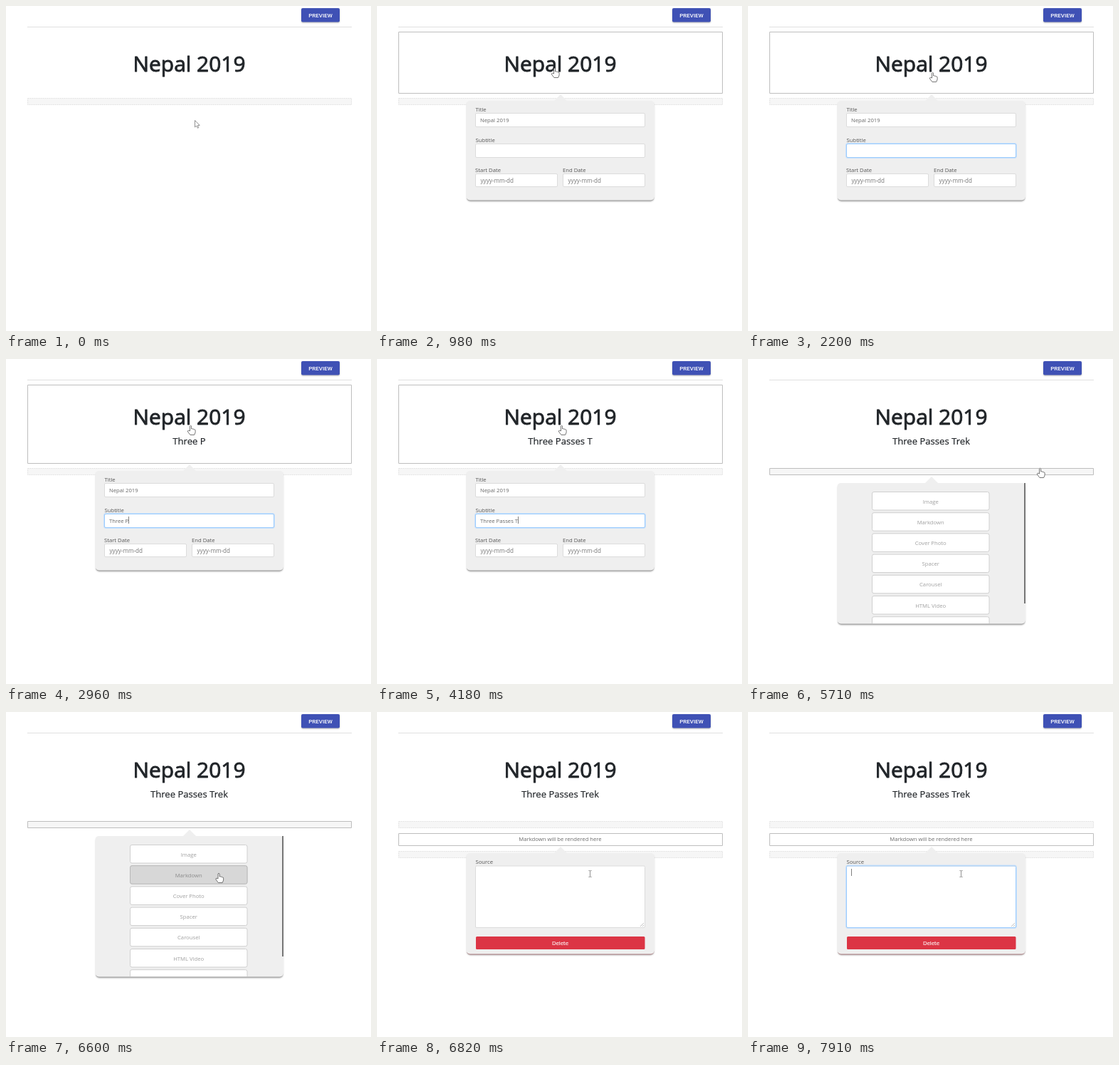
Animation, 513 px wide and 456 px high, one loop 8 s. Source, as an HTML page with a canvas:

```html
<!DOCTYPE html>
<html lang="en">
<head>
<meta charset="utf-8">
<title>Page editor</title>
<style>
  html, body { margin: 0; width: 100%; height: 100%; overflow: hidden; background: #fff; }
  canvas { display: block; }
</style>
</head>
<body>
<canvas id="stage" width="513" height="456"></canvas>
<script>
const ctx = document.getElementById('stage').getContext('2d');
const LOOP = 8000, MID = 257.5;
const SANS = '"Open Sans", "Noto Sans", sans-serif';
const SMALL = '7.7px ' + SANS;
const OUTLINE = '#bebebe';
const MENU = ['Image', 'Markdown', 'Cover Photo', 'Spacer', 'Carousel', 'HTML Video', ''];

// Each track is a list of [start time, value]; values hold until the next start.
const POINTER = [
  [0, ['arrow', 265, 160]], [440, ['hand', 252, 106]], [540, ['hand', 249.5, 87]],
  [1210, ['hand', 255, 91]], [1310, ['hand', 259.5, 93]],
  [5060, ['hand', 275, 100]], [5170, ['hand', 317, 117]], [5270, ['hand', 367, 137]],
  [5380, ['hand', 401, 152]], [5490, ['hand', 410.5, 153]],
  [6040, ['arrow', 400, 167]], [6150, ['arrow', 373, 187]], [6260, ['arrow', 344, 207]],
  [6370, ['hand', 321, 219]], [6490, ['hand', 306, 225]], [6600, ['hand', 299, 226]],
  [6820, ['beam', 299.5, 227]]
];
const SUBTITLE = [
  [0, ''], [2420, 'T'], [2530, 'Th'], [2640, 'Thr'], [2740, 'Three'], [2850, 'Three '],
  [2960, 'Three P'], [3180, 'Three Pas'], [3290, 'Three Pass'], [3400, 'Three Passes'],
  [3520, 'Three Passes '], [4180, 'Three Passes T'], [4290, 'Three Passes Tr'],
  [4400, 'Three Passes Tre'], [4500, 'Three Passes Trek']
];
const CARET = [[0, 0], [1750, 1], [2200, 0], [2420, 1], [3850, 0], [4180, 1], [4950, 0], [5490, 1]];
const TITLE_FOCUS = [[0, 0], [1530, .5], [1640, 1], [1750, .5], [1890, 0]];
const SUBTITLE_FOCUS = [[0, 0], [1750, .5], [1890, 1]];
const ITEM_HOVER = [[0, 0], [6370, .4], [6490, .8], [6600, 1]];
const SOURCE_FOCUS = [[0, 0], [7800, .5], [7910, 1]];

const at = (track, t) => track.reduce((held, [start, v]) => t >= start ? v : held, track[0][1]);

// The optional weight thickens the strokes of the letters.
function text(str, x, y, color, { font = SMALL, align = 'left', weight = 0 } = {}) {
  ctx.font = font;
  ctx.textAlign = align;
  ctx.fillStyle = ctx.strokeStyle = color;
  ctx.fillText(str, x, y);
  if (!weight) return;
  ctx.lineJoin = 'round';
  ctx.lineWidth = weight;
  ctx.strokeText(str, x, y);
}

function box(x, y, w, h, fill, stroke, radius = 0) {
  ctx.beginPath();
  ctx.roundRect(x, y, w, h, radius);
  if (fill) { ctx.fillStyle = fill; ctx.fill(); }
  if (stroke) { ctx.strokeStyle = stroke; ctx.lineWidth = 1; ctx.stroke(); }
}

function shadowed(color, blur, dy, draw) {
  ctx.save();
  ctx.shadowColor = color;
  ctx.shadowBlur = blur;
  ctx.shadowOffsetY = dy;
  draw();
  ctx.restore();
}

function field(x, y, w, h, focus = 0) {
  box(x, y, w, h, '#fff', '#dcdcdc', 1.5);
  if (!focus) return;
  ctx.save();
  ctx.globalAlpha = focus;
  box(x - 1, y - 1, w + 2, h + 2, null, '#c8e1fc', 2.5);
  box(x, y, w, h, null, '#9dccfc', 1.5);
  ctx.restore();
}

function caret(x, y) {
  ctx.fillStyle = '#808080';
  ctx.fillRect(Math.round(x), y, 1, 10);
}

function bar(y, active) {
  ctx.save();
  if (!active) ctx.setLineDash([2, 1]);
  box(30.5, y + .5, 455, 9, '#f6f6f6', active ? OUTLINE : '#e2e2e2');
  ctx.restore();
}

function popup(y, h, edge = '#999') {
  shadowed('rgba(0,0,0,.25)', 2, 1, () => box(126, y + 1, 263.5, h - 1, edge, null, 5));
  box(125.5, y, 264.5, h - 1, '#efefef', null, 5);
  ctx.beginPath();
  ctx.moveTo(MID - 9, y + .5);
  ctx.lineTo(MID + .5, y - 9);
  ctx.lineTo(MID + 10, y + .5);
  ctx.fill();
}

function header(t, subtitle) {
  ctx.fillStyle = '#e0e0e0';
  ctx.fillRect(30, 29, 456, 1);
  shadowed('rgba(0,0,0,.3)', 2, 1, () => box(415, 3, 54, 19.5, '#3f51b5', null, 2));
  text('PREVIEW', 442, 15.7, '#fff', { font: '500 8px Roboto, sans-serif', align: 'center' });
  if (t >= 440 && t < 5710) box(30.5, 36.5, 455, subtitle ? 110 : 86, null, OUTLINE);
  text('Nepal 2019', MID, 92, '#212529', { font: '29.9px ' + SANS, align: 'center', weight: .9 });
  text(subtitle.trim(), MID, 119.8, '#212529', { font: '13.1px ' + SANS, align: 'center', weight: .2 });
}

function titleEditor(t, subtitle) {
  const titleFocus = at(TITLE_FOCUS, t);
  ctx.save();
  ctx.translate(0, subtitle ? 24 : 0);
  popup(133, 140.5);
  text('Title', 138.5, 148, '#555');
  field(138.5, 150.5, 238, 19, titleFocus);
  const selected = t >= 1530 && t < 1750;
  if (selected) {
    ctx.fillStyle = '#3390ff';
    ctx.fillRect(145, 155, 41, 10);
  }
  text('Nepal 2019', 145, 163, selected ? '#fff' : '#666');
  text('Subtitle', 138.5, 190.5, '#555');
  field(138.5, 193.5, 238, 19, at(SUBTITLE_FOCUS, t));
  text(subtitle, 145, 205.5, '#666');
  if (at(CARET, t)) caret(145 + ctx.measureText(subtitle).width, 197);
  [['Start Date', 138.5], ['End Date', 261.5]].forEach(([label, x]) => {
    text(label, x - .5, 232.7, '#555');
    field(x, 235.5, 115, 18);
    text('yyyy-mm-dd', x + 7, 247.8, '#777', { font: '8.1px ' + SANS });
  });
  ctx.restore();
}

function blockMenu(t) {
  const hover = at(ITEM_HOVER, t);
  popup(174, 198.5);
  ctx.save();
  ctx.beginPath();
  ctx.rect(125, 174, 265, 197);
  ctx.clip();
  MENU.forEach((label, i) => {
    const y = 186.5 + i * 29.2;
    box(174.5, y, 164.5, 25.5, '#fff', '#cfcfcf', 2.5);
    if (i === 1 && hover) {
      ctx.globalAlpha = hover;
      box(174.5, y, 164.5, 25.5, '#d7d7d7', '#b8b8b8', 2.5);
      ctx.globalAlpha = 1;
    }
    text(label, 256.7, y + 16, i === 1 && hover ? '#8c8c8c' : '#a0a0a0', { align: 'center' });
  });
  ctx.restore();
  ctx.fillStyle = '#777';
  ctx.fillRect(388, 174, 2, 169);
}

function markdownEditor(t) {
  const focus = at(SOURCE_FOCUS, t);
  box(30.5, 170.5, 455, 17, '#fff', OUTLINE);
  text('Markdown will be rendered here', MID, 180.7, '#6a6a6a', { align: 'center' });
  bar(195, false);
  popup(198, 142.5, '#a8767a');
  text('Source', 138.5, 213.3, '#555');
  field(138.5, 216, 238, 86.5, focus);
  if (focus) caret(145, 220);
  ctx.strokeStyle = '#aaa';
  ctx.lineWidth = .7;
  ctx.beginPath();
  for (const d of [2, 5]) {
    ctx.moveTo(375 - d, 301);
    ctx.lineTo(375, 301 - d);
  }
  ctx.stroke();
  box(139, 315, 237.5, 18, '#dc3545', null, 1.5);
  text('Delete', MID, 326.8, '#fff', { align: 'center', weight: .15 });
}

const SHAPES = {
  arrow: new Path2D('M.5 .5V10L2.8 8L4.3 11.3L5.8 10.6L4.4 7.4H7.2Z'),
  hand: new Path2D('M-1 8V1Q0 -.6 1.1 1V5Q2.4 4.2 3.3 5.4Q4.6 4.8 5.3 6Q6.5 5.7 6.6 7.2V10L5.2 13.5H-.6L-4 9Q-4.4 7.3 -2.9 7.2Z'),
  beam: new Path2D('M-2 -4.5H-.6L0 -4L.6 -4.5H2M0 -4V4M-2 4.5H-.6L0 4L.6 4.5H2')
};

function pointer([shape, x, y]) {
  ctx.save();
  ctx.translate(x, y);
  ctx.lineJoin = 'round';
  ctx.lineWidth = .8;
  ctx.strokeStyle = shape === 'hand' ? '#555' : '#777';
  ctx.fillStyle = '#fff';
  if (shape !== 'beam') ctx.fill(SHAPES[shape]);
  ctx.stroke(SHAPES[shape]);
  ctx.restore();
}

function draw(t) {
  const subtitle = at(SUBTITLE, t);
  ctx.fillStyle = '#fff';
  ctx.fillRect(0, 0, 513, 456);
  header(t, subtitle);
  bar(subtitle ? 153 : 129, t >= 5380 && t < 6720);
  if (t >= 6720) markdownEditor(t);
  else if (t >= 5710) blockMenu(t);
  else if (t >= 980) titleEditor(t, subtitle);
  pointer(at(POINTER, t));
}

const start = performance.now();
function tick() {
  draw((performance.now() - start) % LOOP);
  requestAnimationFrame(tick);
}
tick();
</script>
</body>
</html>
```
